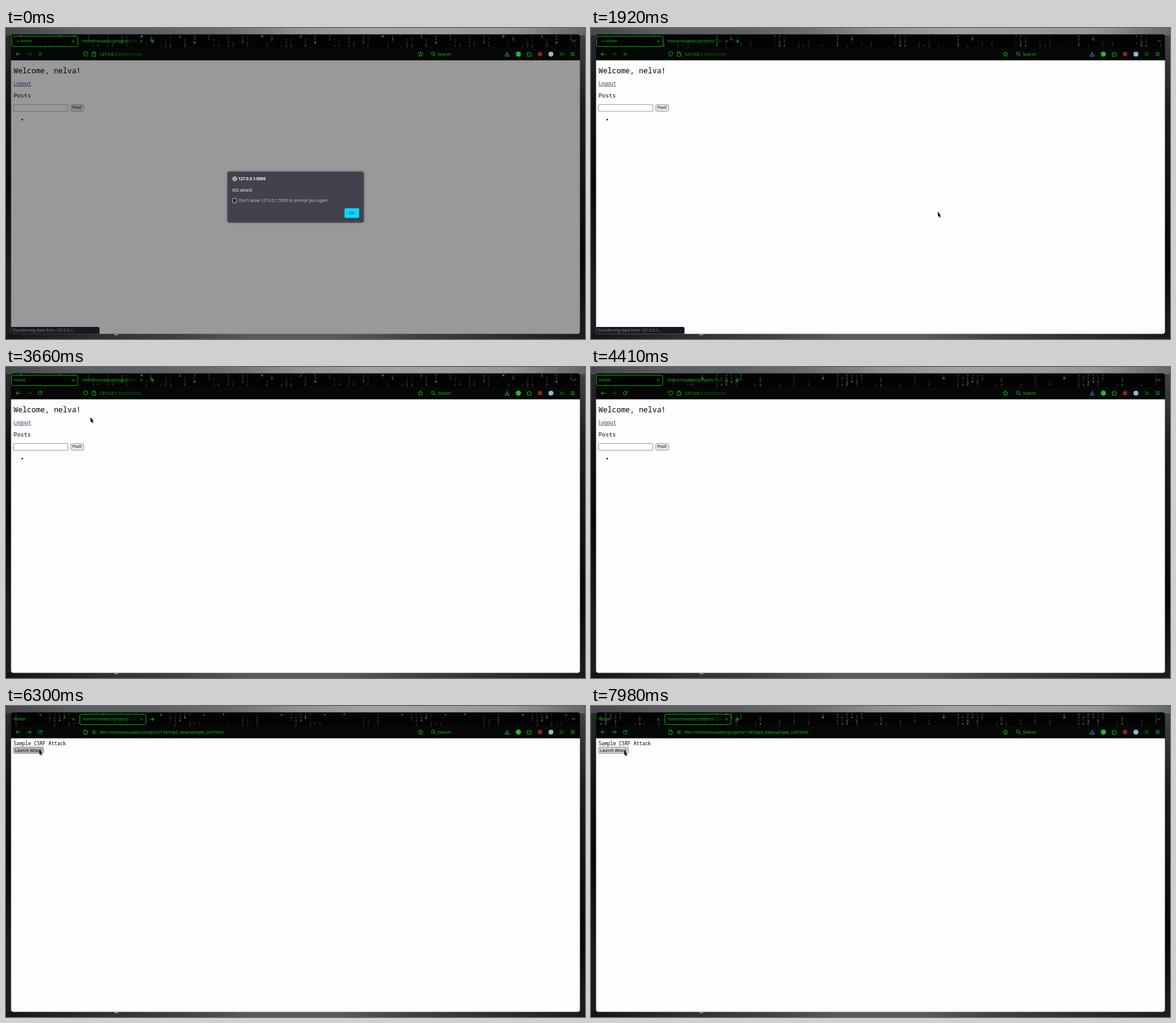
Recreate the animation shown at these times as an HTML page with a canvas. Size 960 px wide and 515 px high, loop 8000 ms.

```html
<!DOCTYPE html>
<html lang="en">
<head>
<meta charset="utf-8">
<title>Browser demo</title>
<style>
html, body { margin: 0; width: 100%; height: 100%; overflow: hidden; background: #111; }
canvas { display: block; width: 960px; height: 515px; }
</style>
</head>
<body>
<canvas id="stage" width="960" height="515"></canvas>
<script>
const ctx = document.getElementById('stage').getContext('2d');
const LOOP = 8000, RAIN_LOOP = 3660;
const CLOSE_DIALOG = 1680, LOADED = 2300, SWITCH_TAB = 4440;
const HOVER = 5560, PRESS = 6120, RELEASE = 6450;
const GREEN = '#08c80c', DIM = '#07680a';
const SANS = '"Noto Sans", sans-serif', MONO = '"Noto Sans Mono", monospace';
const TAU = Math.PI * 2;

// time, x, y of the pointer tip
const pointerPath = [
  [700, 150, 150], [1250, 575, 297], [1480, 575, 297], [1600, 575, 304],
  [2120, 575, 304], [2440, 420, 203], [3000, 165, 96], [3500, 140, 83],
  [3950, 140, 83], [4350, 165, 21], [4650, 165, 21], [5120, 115, 63],
  [5250, 115, 63], [5640, 55, 72], [7320, 55, 72], [7400, 55, 73]
];

function text(str, x, y, size, color, family = SANS, weight = 400) {
  ctx.font = `${weight} ${size}px ${family}`;
  ctx.fillStyle = color;
  ctx.fillText(str, x, y);
}

function rect(x, y, w, h, color) {
  ctx.fillStyle = color;
  ctx.fillRect(x, y, w, h);
}

function box(x, y, w, h, r, fill, border) {
  ctx.beginPath();
  ctx.roundRect(x, y, w, h, r);
  if (fill) { ctx.fillStyle = fill; ctx.fill(); }
  if (border) { ctx.strokeStyle = border; ctx.lineWidth = 0.9; ctx.stroke(); }
}

function disc(x, y, r, color) {
  ctx.beginPath();
  ctx.arc(x, y, r, 0, TAU);
  ctx.fillStyle = color;
  ctx.fill();
}

function icon(x, y, path, color = GREEN, width = 0.9) {
  ctx.save();
  ctx.translate(x, y);
  ctx.strokeStyle = color;
  ctx.lineWidth = width;
  ctx.lineCap = ctx.lineJoin = 'round';
  ctx.stroke(new Path2D(path));
  ctx.restore();
}

function gradient(x0, y0, x1, y1, colors) {
  const g = ctx.createLinearGradient(x0, y0, x1, y1);
  colors.forEach((c, i) => g.addColorStop(i / (colors.length - 1), c));
  return g;
}

function hash(...values) {
  let h = 2166136261;
  for (const v of values) {
    h = Math.imul(h ^ (v + 37), 16777619);
    h ^= h >>> 13;
  }
  h = Math.imul(h, 2246822507);
  return ((h ^ (h >>> 15)) >>> 0) / 4294967296;
}

function drawWallpaper() {
  rect(0, 0, 960, 515, '#0b0c0d');
  rect(0, 0, 9, 515, gradient(0, 0, 0, 515, ['#2b2c2e', '#111213', '#0a0a0b', '#17191a', '#1b1d1f']));
  rect(951, 0, 9, 515, gradient(0, 0, 0, 515, ['#454648', '#1c1d1e', '#111213', '#070708', '#1c1f21']));
  rect(0, 0, 960, 12, gradient(0, 0, 960, 0,
    ['#45484a', '#5d6062', '#5e6163', '#6c6f71', '#8e9294', '#a0a3a6', '#9da0a3', '#95989b', '#64676a']));
  rect(0, 506, 960, 9, gradient(0, 0, 960, 0,
    ['#121314', '#2a2d30', '#3b3f42', '#565b5f', '#565b5f', '#3c4043', '#2b2e31', '#191b1e']));
  rect(180, 507, 6, 1.5, '#a9a47c');
}

function drawRain(t) {
  const glyphs = 'gKjtsHL0129348#!:;<>+=[]rcdafuqVWMTEDxo';
  const phase = (t % RAIN_LOOP) / RAIN_LOOP, cycle = 16;
  ctx.save();
  ctx.beginPath();
  ctx.rect(9, 11, 942, 24);
  ctx.clip();
  ctx.font = `5.8px ${MONO}`;
  for (let col = 0; col < 25; col++) {
    const turns = 1 + Math.floor(hash(col, 1) * 3);
    const trail = 4 + hash(col, 2) * 4;
    const head = hash(col, 3) * cycle + phase * turns * cycle;
    for (let row = 0; row < 5; row++) {
      const age = (((head - row) % cycle) + cycle) % cycle;
      if (age > trail) continue;
      const drop = Math.floor((head - row) / cycle) % turns;
      const glyph = glyphs[Math.floor(hash(col, row, drop, 7) * glyphs.length)];
      const shade = age < 1 ? 165 : 135 - 85 * age / trail;
      ctx.fillStyle = `rgb(${shade * 0.95},${shade},${shade * 0.95})`;
      for (let x = 7 + col * 8 - 200; x < 952; x += 200) ctx.fillText(glyph, x, 15.5 + row * 5.2);
    }
  }
  ctx.restore();
}

function drawTab(x, title, selected, indent = 0) {
  if (selected) box(x + 0.5, 13.5, 109.5, 17.2, 2.5, 'rgba(0,0,0,.8)', GREEN);
  ctx.save();
  ctx.beginPath();
  ctx.rect(x, 12, 97, 20);
  ctx.clip();
  const fade = gradient(x + 78, 0, x + 97, 0, [GREEN, 'rgba(8,200,12,.1)']);
  text(title, x + 4 + indent, 24.3, 6.65, fade);
  ctx.restore();
  icon(x + 102.5, 22, 'M-1.8-1.8 1.8 1.8M1.8-1.8-1.8 1.8', GREEN, 0.8);
}

function drawToolbar(home, loading) {
  rect(8, 33, 944, 21, 'rgba(7,8,8,.93)');
  const arrow = 'M3.5 0H-3.3M-.3-3-3.3 0-.3 3';
  const page = 'M-2.5-3.6H.8L2.7-1.7V3.6H-2.5ZM.6-3.4V-1.5H2.5';
  icon(20, 43.3, arrow);
  icon(38.5, 43.3, 'M-3.5 0H3.3M.3-3 3.3 0 .3 3', home ? DIM : GREEN);
  icon(56.5, 43.3, loading ? 'M-2.6-2.6 2.6 2.6M2.6-2.6-2.6 2.6'
    : 'M2.5-1.7A3.1 3.1 0 1 0 3.1.5M3.2-3.3V-1.1H1');
  if (home) {
    icon(132, 43.3, 'M0-3.8 3.3-2.6C3.4.4 2.6 2.6 0 3.8-2.6 2.6-3.4.4-3.3-2.6Z');
    icon(146, 43.3, page);
    text('127.0.0.1', 155, 45.8, 7, GREEN);
    const hostWidth = ctx.measureText('127.0.0.1').width;
    text(':5000/home', 155 + hostWidth, 45.8, 7, DIM);
  } else {
    icon(132, 43.3, page);
    icon(146, 43.3, 'M-3.5-1.6H-1.3M.9-1.6H3.5M-3.5 1.6H-.9M1.3 1.6H3.5M-1.3-1.6A1 1 0 1 0 .9-1.6 1 1 0 1 0-1.3-1.6M-.9 1.6A1 1 0 1 0 1.3 1.6 1 1 0 1 0-.9 1.6', GREEN, 0.7);
    text('file:///home/nuvadoc/projects/134/mp3_new/sample_csrf.html', 155, 45.8, 7, GREEN);
  }
  icon(687.3, 43.3, 'M0-4 1.2-1.4 4-1.1 1.9.8 2.5 3.6 0 2.2-2.5 3.6-1.9.8-4-1.1-1.2-1.4Z');
  icon(709, 43, 'M1.5-.6A2.6 2.6 0 1 0-3.7-.6 2.6 2.6 0 1 0 1.5-.6M.8 1.3 3.6 4');
  text('Search', 716, 45.8, 7, GREEN);
  icon(831, 43, 'M0-3.6V1.6M-2.2-.5 0 1.7 2.2-.5M-3.4 1.8V3.5H3.4V1.8', '#3aa5d8');
  disc(849.6, 43.3, 4.2, '#20bd22');
  icon(867.5, 43.3, 'M-3.3-1.8H-1.1C-1.4-4.4 1.5-4.4 1.1-1.8H3.3V3.6H-3.3V1.9C-.9 2.2-.9-.4-3.3 0Z');
  disc(885.5, 43.3, 3.7, '#8f2028');
  disc(903.5, 43.3, 4.1, '#8dbbd2');
  icon(921.3, 43.3, 'M-3-2.7-.3 0-3 2.7M.5-2.7 3.2 0 .5 2.7');
  icon(939.5, 43.3, 'M-3-2.4H3M-3 0H3M-3 2.4H3');
}

function drawChrome(t, home, loading) {
  rect(8, 10, 944, 45, '#020302');
  drawRain(t);
  drawTab(9, 'Home', home, loading ? 11 : 0);
  drawTab(122, '/home/nuvadoc/projects/134/mp3_new', !home);
  if (loading) disc(17 + 3.2 * Math.cos(TAU * (t + 90) / 1050), 22, 1.1, GREEN);
  icon(243, 22, 'M-3 0H3M0-3V3', GREEN, 1);
  icon(941.3, 21.5, 'M-2.8-1.3 0 1.5 2.8-1.3', GREEN, 1);
  drawToolbar(home, loading);
}

function drawButton(label, x, y, w, h, fill, border = '#8b8b95') {
  box(x + 0.5, y + 0.5, w, h, 2, fill, border);
  text(label, x + 3, y + 8.1, 6.65, '#000');
}

function drawHome(dimmed) {
  const link = dimmed ? '#20264f' : '#33335c';
  const border = dimmed ? '#66666b' : '#8b8b95';
  text('Welcome, nelva!', 12.5, 74.7, 12.4, '#000', MONO, 500);
  text('Logout', 12.5, 94.8, 8.05, link, MONO);
  rect(12.5, 96, 29, 0.7, link);
  text('Posts', 12.5, 115.1, 9.65, '#000', MONO, 500);
  box(12.5, 126.7, 90, 11.3, 1, dimmed ? '#99999a' : '#fff', border);
  drawButton('Post!', 107, 126.3, 21.2, 11, dimmed ? '#8c8c8f' : '#e9e9ed', border);
  disc(27, 151.7, 1.3, '#000');
}

function drawAttackPage(t) {
  text('Sample CSRF Attack', 12.5, 65, 8.05, '#000', MONO);
  const fill = t >= PRESS && t < RELEASE ? '#b1b1b9' : t >= HOVER ? '#d0d0d7' : '#e9e9ed';
  drawButton('Launch Attack', 12, 67.4, 49.7, 10.5, fill);
}

function drawDialog() {
  ctx.save();
  ctx.shadowColor = 'rgba(0,0,0,.3)';
  ctx.shadowBlur = 4;
  box(367, 237.8, 226.3, 84.5, 4, '#42414d');
  ctx.restore();
  icon(379.3, 249.8, 'M-3.4 0A3.4 3.4 0 1 0 3.4 0 3.4 3.4 0 1 0-3.4 0H3.4M0-3.4C-2.2-1.5-2.2 1.5 0 3.4 2.2 1.5 2.2-1.5 0-3.4', '#fbfbfe', 0.8);
  text('127.0.0.1:5000', 385, 252.1, 6.63, '#fbfbfe', SANS, 700);
  text('XSS attack!', 375, 270.5, 6.63, '#fbfbfe');
  box(375.5, 282.3, 7, 7, 1, '#2b2a33', '#d0d0d8');
  text('Don’t allow 127.0.0.1:5000 to prompt you again', 386.2, 288.2, 6.65, '#c5c5cb');
  box(561.3, 298.5, 24.2, 16, 2, '#00ddff');
  text('OK', 568.5, 309, 6.63, '#2b2a33', SANS, 500);
}

function drawStatus() {
  box(8, 495, 147, 12, [0, 2, 0, 3], '#171821');
  text('Transferring data from 127.0.0.1…', 10.5, 503.4, 6.63, '#85868c');
}

function drawPointer(t) {
  if (t < pointerPath[0][0]) return;
  let [, x, y] = pointerPath.at(-1);
  const next = pointerPath.findIndex(p => p[0] > t);
  if (next > 0) {
    const a = pointerPath[next - 1], b = pointerPath[next];
    const u = (t - a[0]) / (b[0] - a[0]), ease = u * u * (3 - 2 * u);
    x = a[1] + (b[1] - a[1]) * ease;
    y = a[2] + (b[2] - a[2]) * ease;
  }
  ctx.save();
  ctx.translate(x, y);
  const arrow = new Path2D('M-.2 0 5 6.2 3.5 6.7 4.7 9.5 3.3 10.1 2.1 7.4.5 8.4Z');
  ctx.strokeStyle = 'rgba(255,255,255,.5)';
  ctx.lineWidth = 0.8;
  ctx.stroke(arrow);
  ctx.fillStyle = '#000';
  ctx.fill(arrow);
  ctx.restore();
}

function draw(t) {
  const home = t < SWITCH_TAB, dimmed = t < CLOSE_DIALOG, loading = t < LOADED;
  drawWallpaper();
  ctx.save();
  ctx.beginPath();
  ctx.roundRect(8.4, 10.6, 943.2, 496, 4);
  ctx.clip();
  drawChrome(t, home, loading);
  rect(8, 53.5, 944, 454, dimmed ? '#99999a' : '#fdfdfd');
  if (home) drawHome(dimmed); else drawAttackPage(t);
  if (loading) drawStatus();
  ctx.restore();
  if (dimmed) drawDialog();
  drawPointer(t);
}

function tick() {
  draw(performance.now() % LOOP);
  requestAnimationFrame(tick);
}
tick();
</script>
</body>
</html>
```
